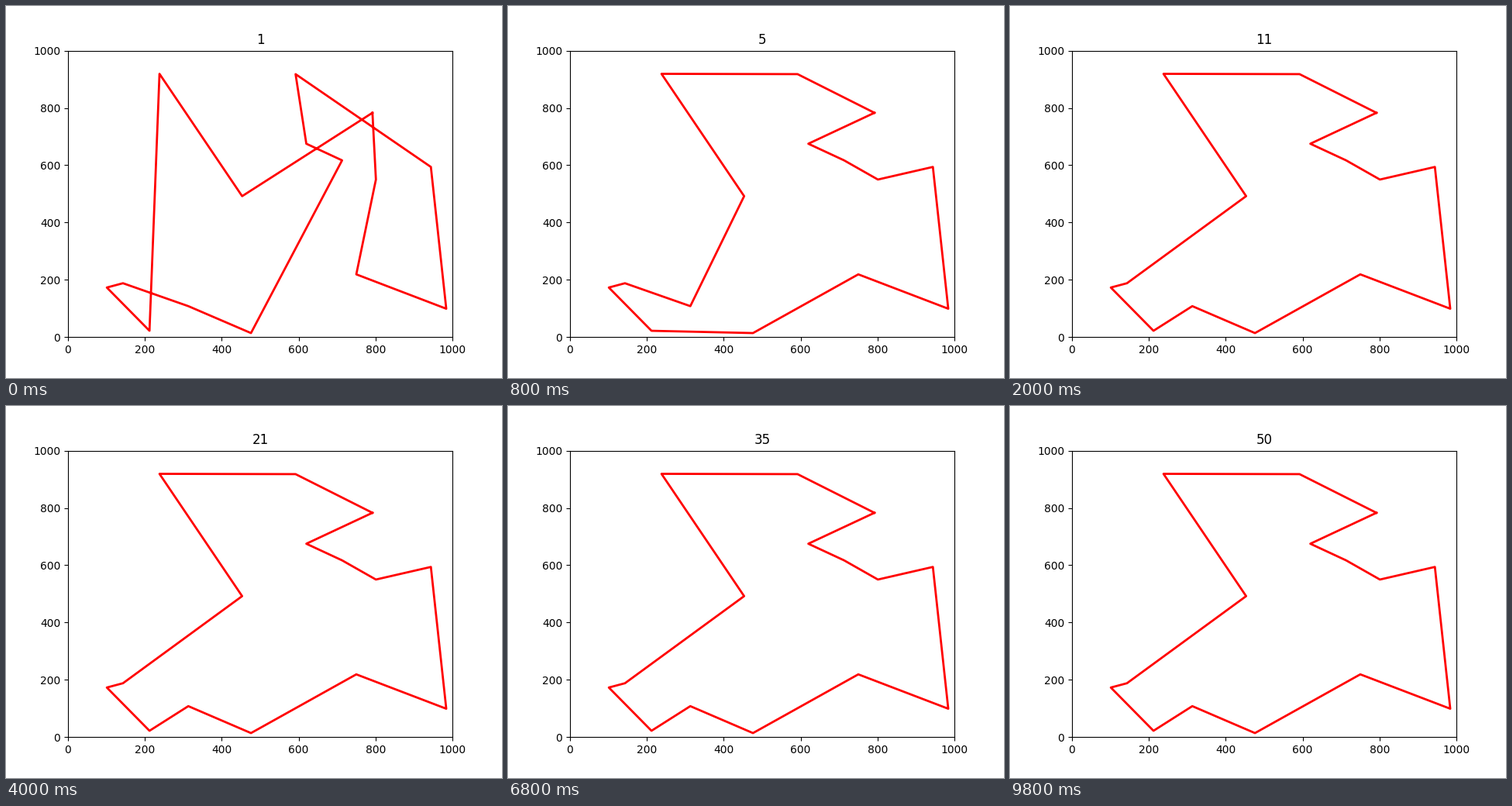
Animation of 640 by 480 pixels, one loop 10000 ms. Source, as a matplotlib script:

```python
import matplotlib.pyplot as plt
from matplotlib.animation import FuncAnimation

STEPS = 50
CITIES = {
    "A": (238, 919), "B": (453, 492), "C": (792, 783), "D": (801, 550),
    "E": (750, 219), "F": (984, 99), "G": (944, 594), "H": (592, 918),
    "I": (620, 675), "J": (713, 617), "K": (476, 14), "L": (313, 108),
    "M": (143, 188), "N": (101, 173), "O": (212, 22),
}
# First step at which each tour is the best one found
TOURS = {
    1: "CDEFGHIJKLMNOAB",
    2: "CIJGDFEKONMLBAH",
    3: "CIJDGFEKONMLBAH",
    6: "CJDGFEKOLMNBAHI",
    9: "CIJDGFEKLONMBAH",
}

fig, ax = plt.subplots(figsize=(6.4, 4.8), dpi=100)
ax.set_xlim(0, 1000)
ax.set_ylim(0, 1000)
line, = ax.plot([], [], color="red", lw=2)
title = ax.set_title("1")


def best_tour(step):
    return TOURS[max(s for s in TOURS if s <= step)]


def draw(frame):
    step = frame + 1
    tour = best_tour(step)
    xs, ys = zip(*(CITIES[c] for c in tour + tour[0]))
    line.set_data(xs, ys)
    title.set_text(str(step))
    return line, title


anim = FuncAnimation(fig, draw, frames=STEPS, init_func=lambda: draw(0),
                     interval=200, repeat=True, repeat_delay=0, blit=False)
plt.show()
```
